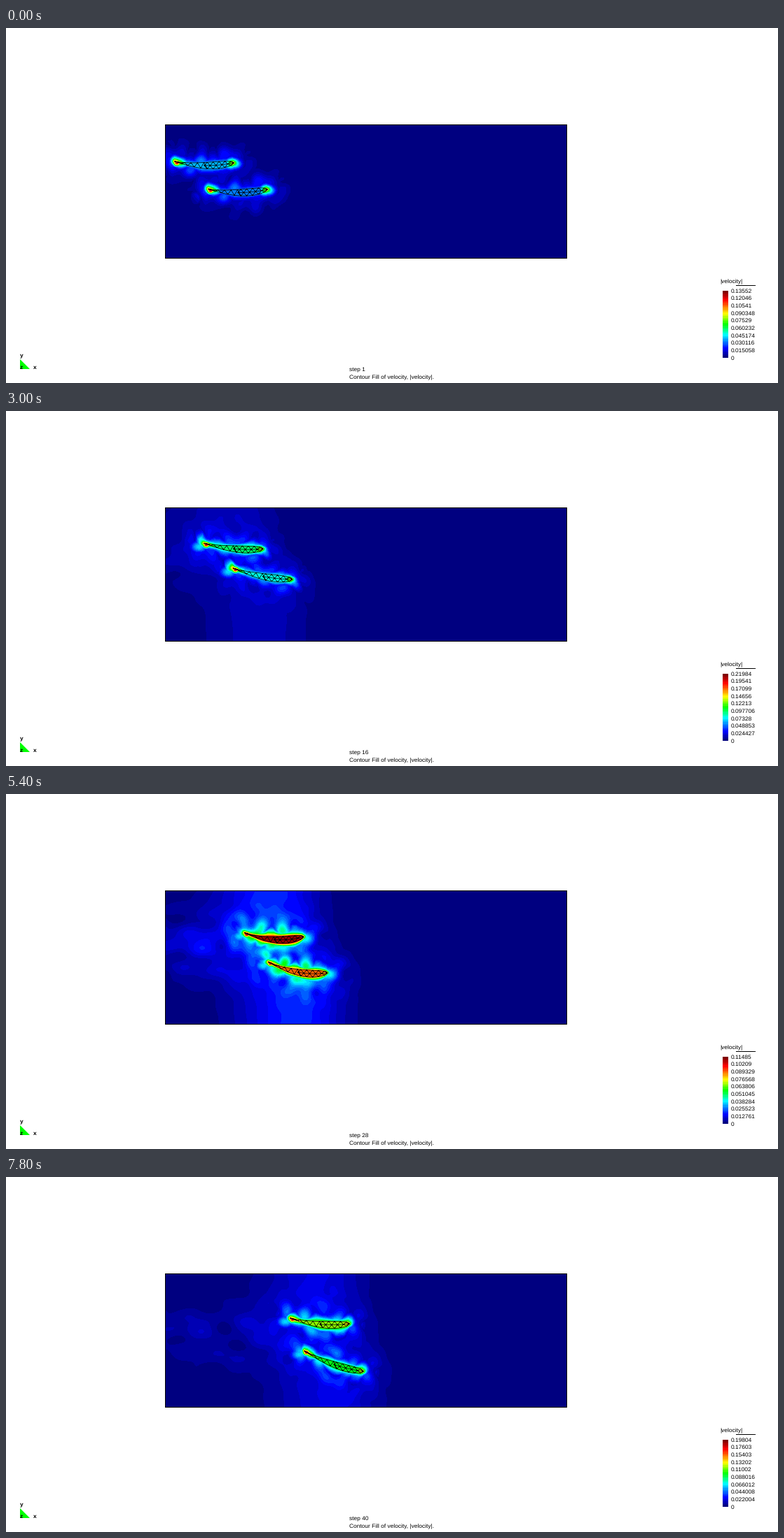
A matplotlib script for the animation above (8000 ms loop, 1102 px wide and 508 px high).

```python
import numpy as np
import matplotlib.pyplot as plt
from matplotlib.animation import FuncAnimation
from matplotlib.colors import LinearSegmentedColormap
from matplotlib.patches import Polygon, Rectangle

W, H, FRAMES, STEP_MS = 1102, 508, 40, 200
LEFT, RIGHT, TOP, BOTTOM = 228, 800, 139, 329  # inside of the tank
LENGTH = 84

# A cubic through these frames gives each swimmer's drift and tilt
ANCHORS = (0, 10, 23, 39)
UPPER = dict(x=(325, 348, 404, 490), y=(193, 195, 202, 210),
             tilt=(2, 8, 6.5, 8), power=1)
LOWER = dict(x=(373, 392, 441, 510), y=(231, 236.5, 250, 278),
             tilt=(.5, 14.5, 15, 29), power=.82)
# Largest speed, which sets the top of the colour scale
PEAK_AT = (0, 10, 15, 23, 27, 34, 39)
PEAK = (.135522, .146292, .219839, .172328, .1148515, .177469, .198036)


def cubic(values, k):
    return np.polyval(np.polyfit(ANCHORS, values, 3), k)


def pose(swimmer, k):
    """Head x, head y, drop from tail to head, bend of the spine."""
    beat = 2 + 5 * np.cos(2 * np.pi * (k - 26.75) / 14.5)
    return [cubic(swimmer[name], k) for name in ("x", "y", "tilt")] + [beat]


def spine(p, u):
    return p[1] - p[2] * (1 - u) + p[3] * 4 * u * (1 - u)


def half_width(u):
    return 15.5 * u ** 1.3 * (1 - u) ** .55


def make_noise(seed, short, long, count=9):
    rng = np.random.default_rng(seed)
    angle = rng.uniform(0, 2 * np.pi, count)
    wave = 2 * np.pi / rng.uniform(short, long, count)
    phase = rng.uniform(0, 2 * np.pi, count)

    def noise(x, y, drift=0):
        total = 0
        for a, w, p in zip(angle, wave, phase):
            total = total + np.cos(w * (x * np.cos(a) + y * np.sin(a)) + p + drift)
        return total / np.sqrt(count)
    return noise


def sigmoid(z):
    return 1 / (1 + np.exp(-z))


def spot(x0, y0, rx, ry):
    return np.exp(-((X - x0) / rx) ** 2 - ((Y - y0) / ry) ** 2)


X, Y = np.meshgrid(np.arange(LEFT, RIGHT) + .5, np.arange(TOP, BOTTOM) + .5)
eddies = make_noise(4, 14, 38)
still_eddies = make_noise(9, 35, 90)(X, Y * 1.3)


def swimmer_field(p, body, near_amp, k):
    """Ripple, near field and bright glow around one swimmer."""
    tail, tail_y = p[0] - LENGTH, spine(p, 0)
    u = np.clip((X - tail) / LENGTH, 0, 1)
    dx = X - (tail + u * LENGTH)
    dy = np.maximum(abs(Y - spine(p, u)) - half_width(u), 0)
    dist = np.hypot(dx, dy)
    n = eddies(X - p[0], Y - p[1], k * .12)

    ends = max(.9, body), max(.72, body * .9)
    level = np.interp(u, [0, .2, .88, 1], [ends[0], body, body, ends[1]])
    glow = level * np.exp(-dist * np.clip(1 + .35 * n, .6, 1.8) / 5.2)
    hot = ends[0] * spot(tail + 3, tail_y + 2, 6, 5)
    puff = .32 * spot(tail - 7, tail_y + 5, 13, 9) * min(1, k / 8)
    near = near_amp * np.exp(-(dist / 18) ** 1.3) * np.clip(1 + .7 * n, 0, 2)
    ripple = n * np.exp(-dist / 16)
    return ripple, near, np.maximum(np.maximum(glow, hot), puff)


def lobe(p, front, back):
    mid = p[0] - LENGTH / 2
    return np.exp(-((X - mid) / np.where(X > mid, front, back)) ** 2)


def field(k, up, low, peak):
    """Speed as a share of the peak, for every pixel of the tank."""
    start = 1 - np.exp(-k / 14)
    body = (.04 + .082 * start) / peak
    parts = [swimmer_field(p, min(.97, body * s["power"]), .019 / peak, k)
             for p, s in ((up, UPPER), (low, LOWER))]
    (ripple_a, near_a, glow_a), (ripple_b, near_b, glow_b) = parts

    middle = (spine(up, .5) + spine(low, .5)) / 2
    side = sigmoid((Y - middle) / 12)
    far = (1 - side) * lobe(up, 59, 76) + side * lobe(low, 62, 82)
    far *= .022 * start / peak * np.clip(1 + .5 * (ripple_a + ripple_b), 0, 2)

    wake_y = (spine(up, 0) + spine(low, 0)) / 2
    wake = (.0085 * min(1, k / 8) / peak
            * sigmoid((up[0] - LENGTH + 15 - X) / 18)
            * np.exp(-((Y - wake_y) / 50) ** 2)
            * np.clip(1 + .5 * still_eddies, 0, 2))
    calm = far + wake + np.maximum(near_a, near_b)
    return np.clip(np.maximum(calm, np.maximum(glow_a, glow_b)), 0, .999)


def mesh_lines(p):
    """Outline and triangles of one swimmer as a line with gaps."""
    pts = []

    def path(stations, sides):
        for u, s in zip(stations, sides):
            pts.append((p[0] - LENGTH * (1 - u), spine(p, u) + s * half_width(u)))
        pts.append((np.nan, np.nan))

    edge = np.linspace(0, 1, 50)
    rear = np.linspace(0, .55, 11)
    front = np.linspace(.5, 1, 11)
    path(rear, [(-1) ** i for i in range(len(rear))])
    path(front, [0] * len(front))
    for s in (-1, 1):
        path(edge, [s] * len(edge))
        path(front, [s * (i % 2) for i in range(len(front))])
    return np.array(pts).T


plt.rcParams["font.family"] = "Liberation Sans"
plt.rcParams["text.hinting"] = "none"
fig = plt.figure(figsize=(W / 100, H / 100), dpi=100, facecolor="white")
ax = fig.add_axes([0, 0, 1, 1])
PX = .72
heat = LinearSegmentedColormap.from_list("heat", [
    (0, "#000080"), (.125, "#0000ff"), (.34, "#00ffff"), (.5, "#00ff00"),
    (.66, "#ffff00"), (.875, "#ff0000"), (1, "#800000")], N=40)


def label(x, y, text, **style):
    return ax.text(x, y, text, fontsize=8.4 * PX, color="black",
                   va="baseline", **style)


def shade(data, box):
    return ax.imshow(data, cmap=heat, vmin=0, vmax=1, extent=box,
                     interpolation="nearest", zorder=2)


# Black rectangle one pixel larger than the tank serves as its border
ax.add_patch(Rectangle((LEFT - 1, TOP - 1), RIGHT - LEFT + 2, BOTTOM - TOP + 2,
                       fc="black", lw=0, zorder=1))
picture = shade(np.zeros(X.shape), (LEFT, RIGHT, BOTTOM, TOP))
meshes = [ax.plot([], [], color="black", lw=.75 * PX, zorder=3)[0]
          for _ in range(2)]

# Legend
label(1019, 365, "|velocity|")
ax.add_patch(Rectangle((1042, 368), 28, 1, fc="black", lw=0))
shade(np.linspace(1, 0, 96)[:, None], (1023, 1031, 472, 376))
ticks = [label(1035, 378.5 + i * 10.67, "") for i in range(10)]

# Axis triad and captions
ax.add_patch(Polygon([(20, 474), (20, 488), (34, 488)], fc="#00ff00", lw=0))
label(20, 470, "y", weight="bold")
label(20, 488.5, "z", weight="bold")
label(38.5, 488.5, "x", weight="bold")
step_text = label(490, 491.5, "")
label(490, 502.5, "Contour Fill of velocity, |velocity|.")

ax.set_xlim(0, W)
ax.set_ylim(H, 0)
ax.set_aspect("auto")
ax.axis("off")


def draw(k):
    up, low = pose(UPPER, k), pose(LOWER, k)
    peak = np.interp(k, PEAK_AT, PEAK)
    picture.set_data(field(k, up, low, peak))
    for line, p in zip(meshes, (up, low)):
        line.set_data(*mesh_lines(p))
    for i, tick in enumerate(ticks):
        tick.set_text(f"{peak * (9 - i) / 9:.5g}")
    step_text.set_text(f"step {k + 1}")
    return [picture, *meshes, *ticks, step_text]


anim = FuncAnimation(fig, draw, frames=FRAMES, interval=STEP_MS,
                     repeat=True, repeat_delay=0)
plt.show()
```
